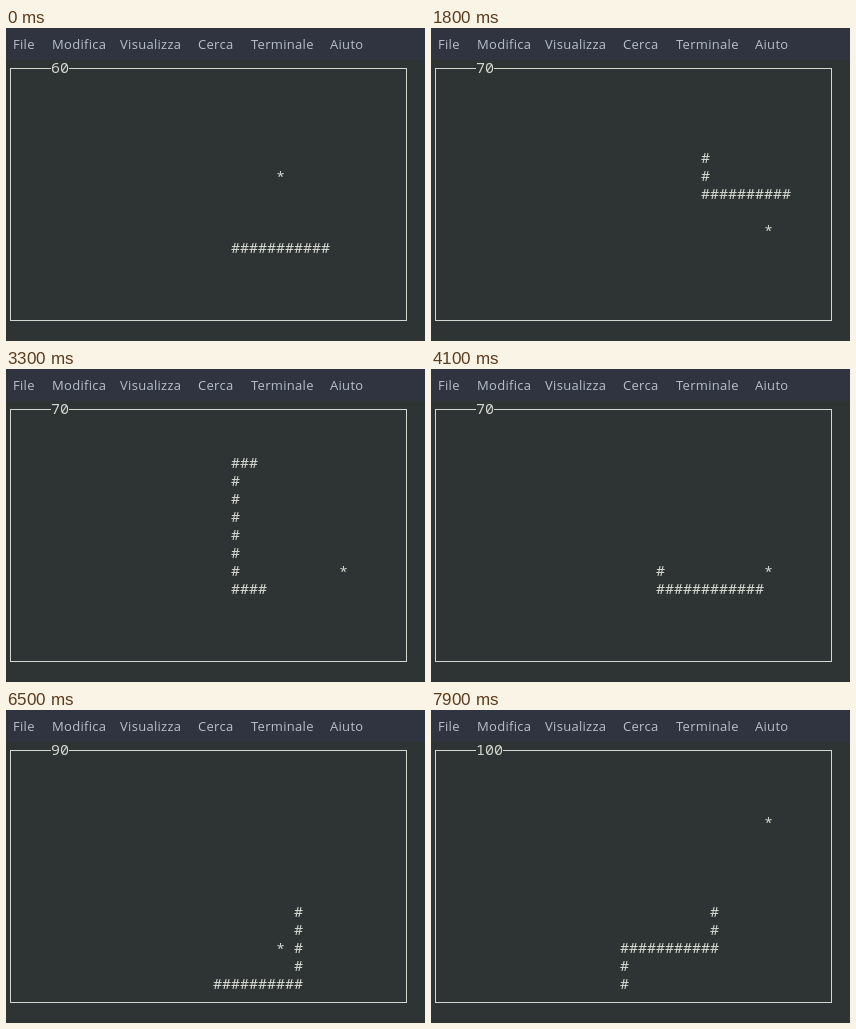
Write an HTML page with a canvas that moves like this. It is 419x313 px and loops after 8 s.

```html
<!DOCTYPE html>
<html lang="it">
<head>
<meta charset="utf-8">
<title>Snake</title>
<style>
html, body { margin: 0; width: 100%; height: 100%; overflow: hidden; background: #2e3434; }
canvas { display: block; }
</style>
</head>
<body>
<canvas id="stage" width="419" height="313"></canvas>
<script>
const ctx = document.getElementById('stage').getContext('2d', { alpha: false });
const BG = '#2e3434', INK = '#d3d7cf';
const CELL_W = 9, CELL_H = 18, TICK = 100, TICKS = 80, HOLD = 3, START_LENGTH = 11;

const menu = [['File', 7], ['Modifica', 46], ['Visualizza', 114],
  ['Cerca', 192], ['Terminale', 245], ['Aiuto', 324]];
const foods = [[30, 6], [37, 9], [32, 12], [30, 11], [37, 4]];
const meals = [17, 45, 61, 84];    // steps at which food is eaten
const growth = [17, 33, 61, 84];   // steps at which the tail stays put
const quickTurns = [4, 7, 16, 20, 25, 44, 49, 54, 62, 73, 85]; // corners passed within a tick

// The route begins with the cells the snake already covers.
const dirs = { R: [1, 0], L: [-1, 0], U: [0, -1], D: [0, 1] };
const route = [[25, 10]];
for (const leg of 'R14 U3 L9 U4 L5 D7 R12 U5 L5 D8 L11 U2 R10 U2'.split(' ')) {
  const [dx, dy] = dirs[leg[0]];
  for (let n = +leg.slice(1); n > 0; n--) {
    const [x, y] = route[route.length - 1];
    route.push([x + dx, y + dy]);
  }
}
const steps = route.slice(START_LENGTH - 1).map((_, i) => i)
  .filter(i => !quickTurns.includes(i));

const passed = (list, step) => list.filter(s => s <= step).length;

function put(text, col, row, dy = 0) {
  ctx.fillText(text, col * CELL_W, 45 + row * CELL_H + dy);
}

function drawMenu() {
  ctx.fillStyle = '#2f3440';
  ctx.fillRect(0, 0, 419, 32);
  ctx.fillStyle = '#b9c0ca';
  ctx.font = '13px "Open Sans", "Noto Sans", sans-serif';
  ctx.letterSpacing = '0.3px';
  for (const [label, x] of menu) ctx.fillText(label, x, 21);
  ctx.letterSpacing = '0px';
}

function draw(tick) {
  const step = steps[Math.max(0, tick - HOLD)];
  const eaten = passed(meals, step);
  const score = String(60 + 10 * eaten);

  ctx.fillStyle = BG;
  ctx.fillRect(0, 0, 419, 313);
  drawMenu();

  ctx.strokeStyle = INK;
  ctx.lineWidth = 1;
  ctx.strokeRect(4.5, 40.5, 396, 252);
  ctx.fillStyle = BG;
  ctx.fillRect(5 * CELL_W, 34, score.length * CELL_W, 13);

  ctx.fillStyle = INK;
  ctx.font = '15px "Noto Sans Mono", "DejaVu Sans Mono", monospace';
  put(score, 5, 0);
  put('*', ...foods[eaten], 1);

  const head = step + START_LENGTH;
  const length = START_LENGTH + passed(growth, step);
  for (const [x, y] of route.slice(head - length, head)) put('#', x, y);
}

function loop() {
  draw(Math.floor(performance.now() / TICK) % TICKS);
  requestAnimationFrame(loop);
}
loop();
</script>
</body>
</html>
```
